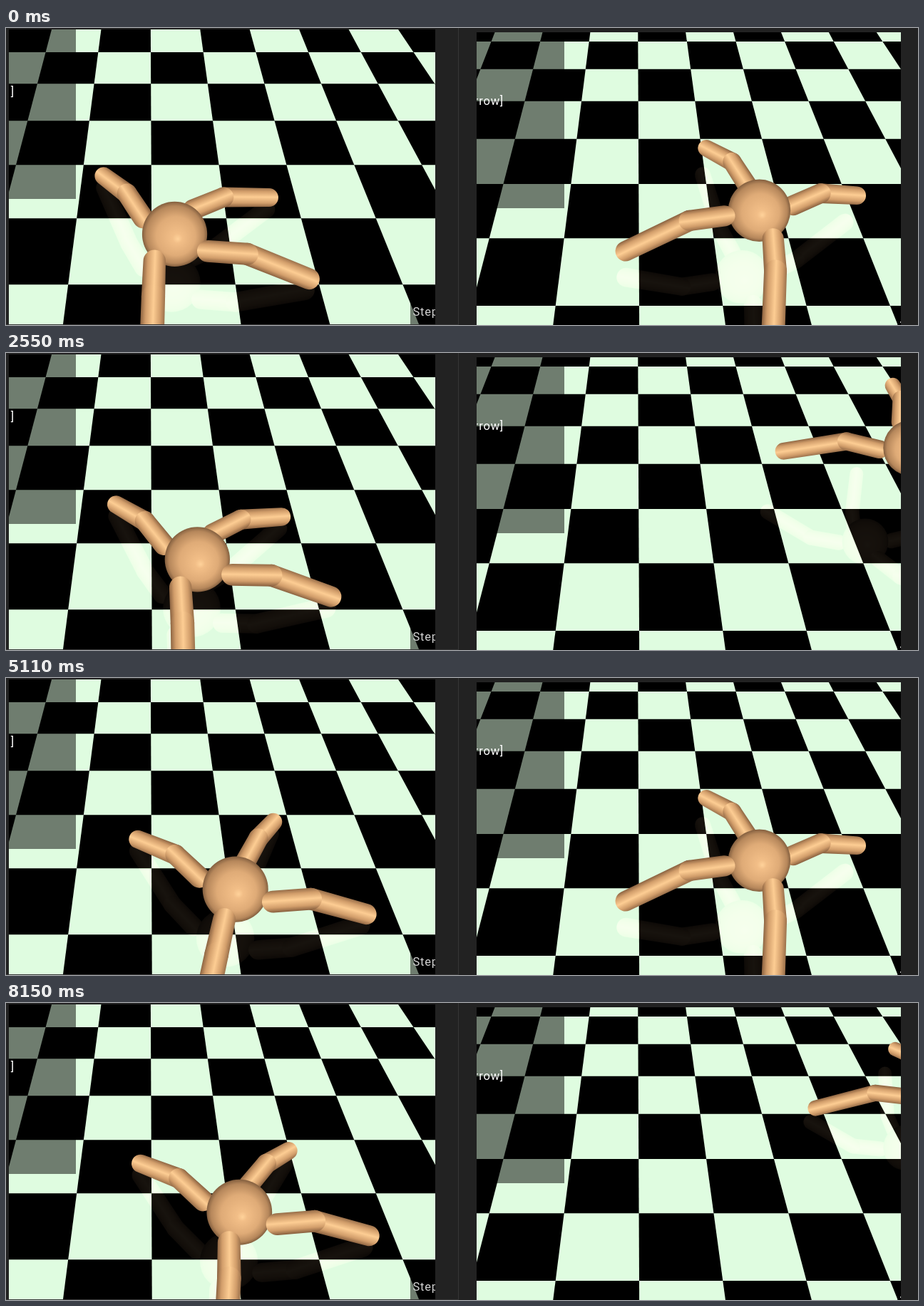
Animation, 1279 px wide and 417 px high, one loop 8300 ms. Source, as an HTML page with a canvas:

```html
<!DOCTYPE html>
<html lang="en">
<head>
<meta charset="utf-8">
<title>Two walkers</title>
<style>
html, body { margin: 0; width: 100%; height: 100%; overflow: hidden; background: #222; }
canvas { display: block; }
</style>
</head>
<body>
<canvas id="stage" width="1279" height="417"></canvas>
<script>
const W = 1279, H = 417, LOOP = 8300, RESET = 4340;
const ctx = document.getElementById('stage').getContext('2d');

function layer() {
  const c = document.createElement('canvas');
  c.width = W;
  c.height = H;
  return c.getContext('2d');
}

// Both cameras look down at 45 degrees; one floor tile is the unit of length.
const FOCAL = 700.8, TILT = Math.SQRT1_2, EYE = 3.74 / TILT;
const views = [
  { x: 4, y: 2, w: 598, h: 414, cx: 200.5, cy: 183.5, stretch: 1 },
  { x: 660, y: 6, w: 595, h: 411, cx: 884, cy: 210, stretch: 1.018 }
];

function project(v, [x, d, z]) {
  const up = (EYE - z) * TILT, along = d * TILT;
  const depth = up + along, scale = FOCAL / depth;
  return {
    x: v.cx + x * scale,
    y: v.cy + (up - along) * scale * v.stretch,
    scale, depth
  };
}

function clipTo(c, v) {
  c.beginPath();
  c.rect(v.x, v.y, v.w, v.h);
  c.clip();
}

function drawFloor(c, v) {
  c.save();
  clipTo(c, v);
  c.fillStyle = '#000';
  c.fillRect(v.x, v.y, v.w, v.h);
  c.fillStyle = '#dffce0';
  for (let n = -2; n < 7; n++) {
    for (let k = -5; k < 8; k++) {
      if ((n + k) % 2 === 0) continue;
      const x = k + 0.034, d = 8.159 - n;
      const corners = [[x, d, 0], [x + 1, d, 0], [x + 1, d - 1, 0], [x, d - 1, 0]];
      c.beginPath();
      corners.map(p => project(v, p)).forEach(p => c.lineTo(p.x, p.y));
      c.fill();
    }
  }
  c.restore();
}

const scene = layer(), mirror = layer();
scene.fillStyle = '#222';
scene.fillRect(0, 0, W, H);
scene.fillStyle = '#363636';
scene.fillRect(634, 0, 1, H);
scene.fillRect(0, 416, 634, 1);
views.forEach(v => drawFloor(scene, v));

// Walker proportions.
const BODY = 0.38, LIMB = 0.125, UPPER = 0.44, REACH = 0.78, DROP = 0.42;
const rad = a => a * Math.PI / 180;

// Joints of the four legs; swings are how far each foot turns from its rest direction.
function legsOf({ x, d, z, yaw, lean, swings }) {
  return swings.map((swing, i) => {
    const rest = rad(yaw + 135 - 90 * i), turn = rest + rad(swing * 1.33);
    const at = (out, drop) => {
      const dx = UPPER * Math.cos(rest) + out * Math.cos(turn);
      const dd = UPPER * Math.sin(rest) + out * Math.sin(turn);
      return [x + dx, d + dd, Math.max(LIMB, z - drop + dd * lean)];
    };
    return [at(0, 0), at(UPPER, 0), at(UPPER + REACH, DROP)];
  });
}

// Key points: time, place across, sway of the back and front legs.
const shuffle = [
  [0, 0.3, 23], [450, 0.32, 23], [1390, 0.72, -9], [1690, 0.7, -7], [2150, 0.56, 22],
  [3010, 0.57, 22], [4020, 1, 4], [5490, 1, 5], [5840, 1, 12], [8150, 1.05, 12]
];
// Key points: time since the start, across, away, height, heading, sway.
const run = [
  [0, 0.68, 3.81, 0.54, 42, 5], [620, 1.5, 4.03, 0.7, 56, -14],
  [840, 1.96, 4.04, 0.6, 68, 20], [1350, 1.96, 4.04, 0.6, 68, 20],
  [2010, 2.53, 4.55, 0.75, 68, -32], [2310, 2.91, 4.8, 1.02, 62, -18],
  [3150, 3.76, 5.36, 0.97, 48, 15], [3660, 4.5, 5.95, 0.55, 49, 5],
  [4640, 5.9, 6.6, 0.55, 49, 5]
];

function valuesAt(keys, t) {
  const i = keys.findLastIndex(k => k[0] <= t);
  const a = keys[i], b = keys[i + 1] || a;
  const u = (t - a[0]) / (b[0] - a[0] || 1), e = u * u * (3 - 2 * u);
  return a.map((p, j) => p + (b[j] - p) * e).slice(1);
}

function leftWalker(t) {
  const [x, sway] = valuesAt(shuffle, t);
  return {
    x, d: 3.41 + 0.004 * sway, z: 0.54, yaw: 8 + 14 * x, lean: 0,
    swings: [-22, -sway, 21, sway]
  };
}

function rightWalker(t) {
  const since = t < RESET ? t + 620 : Math.max(0, t - RESET - 150);
  const [x, d, z, yaw, sway] = valuesAt(run, since);
  return {
    x, d, z, yaw, lean: 0.016 * Math.max(0, sway),
    swings: [-8 - sway / 2, -5 - sway * 0.7, 12, sway]
  };
}

function tint(gradient, stops) {
  stops.forEach(([at, color]) => gradient.addColorStop(at, color));
  return gradient;
}

function limb(c, a, b) {
  const dir = Math.atan2(b.y - a.y, b.x - a.x), side = Math.PI / 2;
  const ra = LIMB * a.scale, rb = LIMB * b.scale, r = Math.max(ra, rb);
  const nx = -Math.sin(dir) * r, ny = Math.cos(dir) * r;
  c.fillStyle = tint(c.createLinearGradient(a.x - nx, a.y - ny, a.x + nx, a.y + ny), [
    [0, '#956c48'], [0.2, '#d19d6a'], [0.48, '#fdcd93'], [0.78, '#d29e6b'], [1, '#875f3e']
  ]);
  c.beginPath();
  c.arc(a.x, a.y, ra, dir + side, dir - side);
  c.arc(b.x, b.y, rb, dir - side, dir + side);
  c.fill();
}

function ball(c, p) {
  const r = BODY * p.scale;
  c.fillStyle = tint(c.createRadialGradient(p.x + r * 0.1, p.y + r * 0.15, 0, p.x, p.y, r), [
    [0, '#ffd29a'], [0.15, '#f2be87'], [0.6, '#dfab77'], [0.88, '#b6875b'], [1, '#835f3f']
  ]);
  c.beginPath();
  c.arc(p.x, p.y, r, 0, Math.PI * 2);
  c.fill();
}

// Parts are painted from far to near; flip -1 gives the reflection in the floor.
function drawWalker(c, v, walker, flip) {
  const place = ([x, d, z]) => project(v, [x, d, z * flip]);
  const body = place([walker.x, walker.d, walker.z]);
  const parts = [{ depth: body.depth, paint: () => ball(c, body) }];
  for (const leg of legsOf(walker)) {
    const [hip, knee, foot] = leg.map(place);
    for (const [a, b] of [[hip, knee], [knee, foot]]) {
      parts.push({ depth: (a.depth + b.depth) / 2, paint: () => limb(c, a, b) });
    }
  }
  parts.sort((a, b) => b.depth - a.depth).forEach(p => p.paint());
}

function paintWalker(v, walker) {
  mirror.clearRect(0, 0, W, H);
  drawWalker(mirror, v, walker, -1);
  ctx.save();
  clipTo(ctx, v);
  ctx.globalCompositeOperation = 'lighter';
  ctx.globalAlpha = 0.09;
  ctx.drawImage(mirror.canvas, 0, 0);
  ctx.globalCompositeOperation = 'source-over';
  ctx.globalAlpha = 1;
  drawWalker(ctx, v, walker, 1);
  ctx.restore();
}

function shade(x, y, w, h) {
  ctx.fillStyle = 'rgba(0,0,0,0.5)';
  ctx.fillRect(x, y, w, h);
}

function label(v, text, x, y, align, color) {
  ctx.save();
  clipTo(ctx, v);
  ctx.font = '16.5px Roboto, sans-serif';
  ctx.letterSpacing = '0.8px';
  ctx.textAlign = align;
  ctx.fillStyle = color;
  ctx.fillText(text, x, y);
  ctx.restore();
}

function draw(now) {
  const t = now % LOOP;
  const [left, right] = views;
  ctx.drawImage(scene.canvas, 0, 0);
  paintWalker(left, leftWalker(t));
  paintWalker(right, rightWalker(t));
  shade(4, 2, 94, 238);
  shade(660, 6, 123, 247);
  shade(567, 387, 35, 29);
  shade(1250, 401, 5, 16);
  label(left, ']', 12, 95, 'right', '#fff');
  label(right, 'rrow]', 698, 108, 'right', '#fff');
  label(left, 'Step', 570.5, 404, 'left', '#d4d4d4');
  ctx.fillStyle = '#bbb';
  ctx.fillRect(1254, 412, 1, 2);
}

const t0 = performance.now();
function tick() {
  draw(performance.now() - t0);
  requestAnimationFrame(tick);
}
tick();
</script>
</body>
</html>
```
